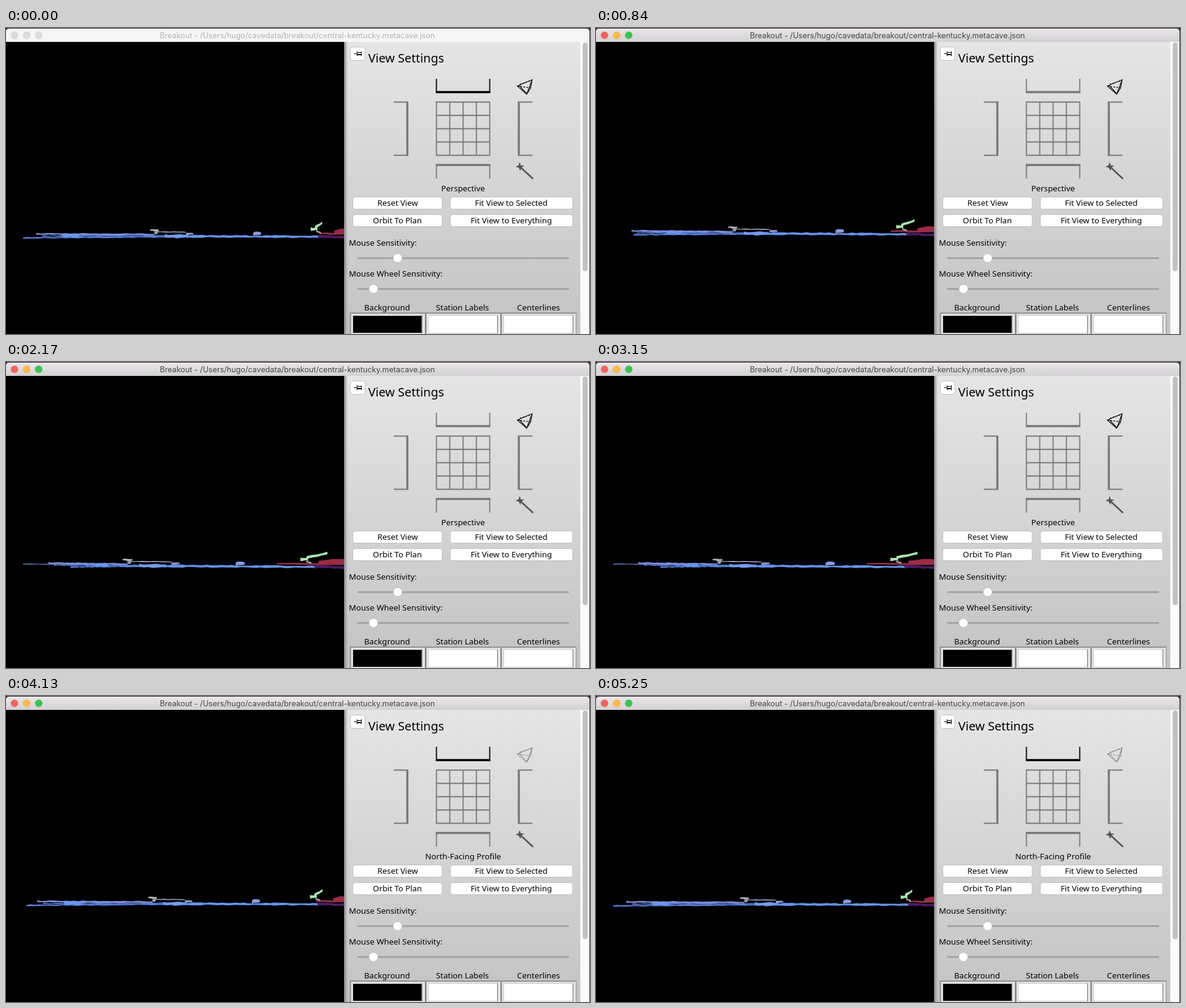
Write an HTML page with a canvas that moves like this. It is 964 px wide and 506 px high and loops after 5320 ms.

```html
<!DOCTYPE html>
<html lang="en">
<head>
<meta charset="utf-8">
<title>Cave viewer</title>
<style>
html, body { margin: 0; width: 100%; height: 100%; overflow: hidden; background: #000; }
#stage { position: relative; width: 964px; height: 506px; overflow: hidden; }
canvas, svg { position: absolute; left: 0; top: 0; display: block; }
text { font: 13.3px "Noto Sans", "Open Sans", sans-serif; fill: #000; }
.mid { text-anchor: middle; }
.head { font-size: 20px; }
.title { font: 12.7px Inter, Roboto, sans-serif; fill: #454545; }
.lines { fill: none; stroke: #777; stroke-width: 1.8; }
.thick { stroke-width: 3.4; }
.btn { fill: #fff; stroke: #b4b4b4; stroke-width: .8; }
.track { stroke: #a4a4a4; stroke-width: 3; stroke-linecap: round; }
.knob { fill: #fff; stroke: #aaa; stroke-width: .7; }
.north .top { stroke: #000; }
.eye { fill: none; stroke: #111; stroke-width: 1.3; }
.flying .eye { stroke: #777; stroke-width: .9; }
.idle .bar { fill: #f6f6f6; }
.idle .title { fill: #b4b4b4; }
.idle .light { fill: #dcdcdc; stroke: #cfcfcf; }
.light { stroke: #0002; stroke-width: .6; }
</style>
</head>
<body>
<div id="stage">
<canvas id="cave" width="558" height="506"></canvas>
<svg id="ui" width="964" height="506" viewBox="0 0 964 506">
  <defs>
    <linearGradient id="barFill" x2="0" y2="1"><stop stop-color="#e9e7e9"/><stop offset="1" stop-color="#d2d0d2"/></linearGradient>
    <linearGradient id="panelFill" x2="0" y2="1"><stop stop-color="#e5e5e5"/><stop offset="1" stop-color="#c3c3c3"/></linearGradient>
    <linearGradient id="edgeFill"><stop stop-color="#888"/><stop offset="1" stop-color="#888" stop-opacity="0"/></linearGradient>
  </defs>
  <rect width="964" height="2" fill="#3c2832"/>
  <path class="bar" fill="url(#barFill)" d="M0 23V6Q0 1 5 1H958Q963 1 963 6V23Z"/>
  <circle class="light" cx="14" cy="12" r="6" fill="#fc605b"/>
  <circle class="light" cx="34" cy="12" r="6" fill="#fdbc40"/>
  <circle class="light" cx="54" cy="12" r="6" fill="#34c84a"/>
  <text class="title mid" x="481" y="17">Breakout - /Users/hugo/cavedata/breakout/central-kentucky.metacave.json</text>

  <rect x="558" y="23" width="390" height="483" fill="url(#panelFill)"/>
  <rect x="558" y="23" width="6" height="483" fill="url(#edgeFill)"/>
  <rect x="948" y="23" width="15" height="483" fill="#fafafa"/>
  <rect x="952" y="24" width="8" height="378" rx="4" fill="#c1c1c1"/>
  <rect x="963" y="2" width="1" height="504" fill="#4b3a42"/>

  <rect class="btn" x="568.5" y="31.5" width="24" height="22" rx="4"/>
  <path d="M574.500 42.500H579M579.500 38.500V46.500M580 40.500H586M580 43.500H586M580 44.500H586M586.500 38.500V46.500" stroke="#000"/>
  <text class="head" x="598" y="56.500">View Settings</text>

  <g class="lines">
    <path id="grid"/>
    <path class="top" d="M710.500 84V107M798.500 84V107"/>
    <path class="top thick" d="M709.600 106H799.400"/>
    <path d="M710.500 225V249M798.500 225V249M640 122.500H664M640 210.500H664M845 122.500H869M845 210.500H869"/>
    <path class="thick" d="M709.600 226.500H799.400M662.500 122V211M846.500 122V211"/>
  </g>
  <g class="eye">
    <path d="M844 96L868.500 85.500L866 99L859.500 109.500ZM868.500 85.500L859.500 109.500"/>
    <path d="M844 96L866 99M848 93L867 87" stroke-dasharray="3 2"/>
    <path d="M847 95L860 109"/>
  </g>
  <path d="M848 229L870 249.500" stroke="#555" stroke-width="2.700"/>
  <path d="M848 221.500L849.700 227L856 228L850.500 230.500L849 236.500L846.500 231L841 229.500L846 227Z" fill="#555"/>

  <text id="mode" class="mid" x="754.500" y="270">Perspective</text>
  <g class="btn">
    <rect x="572.500" y="279.500" width="147.500" height="20" rx="4"/>
    <rect x="733.500" y="279.500" width="202" height="20" rx="4"/>
    <rect x="572.500" y="308.500" width="147.500" height="20" rx="4"/>
    <rect x="733.500" y="308.500" width="202" height="20" rx="4"/>
  </g>
  <text class="mid" x="646.500" y="294">Reset View</text>
  <text class="mid" x="834" y="294">Fit View to Selected</text>
  <text class="mid" x="646" y="323">Orbit To Plan</text>
  <text class="mid" x="834" y="323">Fit View to Everything</text>

  <text x="566" y="360">Mouse Sensitivity:</text>
  <path class="track" d="M581 380.500H928M581 431.500H928"/>
  <circle class="knob" cx="646.500" cy="380.500" r="7.500"/>
  <text x="566" y="411">Mouse Wheel Sensitivity:</text>
  <circle class="knob" cx="606.500" cy="431.500" r="7.500"/>

  <text class="mid" x="629" y="467">Background</text>
  <text class="mid" x="753.500" y="467">Station Labels</text>
  <text class="mid" x="879" y="467">Centerlines</text>
  <g id="swatches"></g>
</svg>
</div>
<script>
const LOOP = 5320, STEP = 70, DRAG = 140, REST = 2170, CLICK = 3430;
const byId = id => document.getElementById(id);
const ui = byId('ui'), mode = byId('mode'), ctx = byId('cave').getContext('2d');

let grid = '';
for (let i = 0; i <= 4; i++)
  grid += `M${710.5 + 22 * i} 121.600V211.400M709.600 ${122.5 + 22 * i}H799.400`;
byId('grid').setAttribute('d', grid);

byId('swatches').innerHTML = ['#000', '#fff', '#fff'].map((fill, i) => {
  const x = 568 + 124.5 * i;
  return `<rect x="${x}" y="471" width="124" height="40" fill="#e9e9e9" stroke="#868686"/>
    <path d="M${x + 1} 506V472H${x + 123}" fill="none" stroke="#727272"/>
    <rect x="${x + 4.5}" y="475.500" width="114" height="29" fill="${fill}" stroke="#c8c8c8"/>
    <path d="M${x + 119} 475V505" stroke="#777"/>`;
}).join('');

// Colour, thickness, both ends, and how far each end swings off the common depth.
const passages = [
  ['#5683e0', 2.4, 28, 347, 300, 345],
  ['#6a86da', 1.8, 110, 342, 190, 342, -111],
  ['#6084da', 1.8, 60, 344, 265, 343.5, -40],
  ['#8091e0', 2.8, 50, 340.5, 245, 341.5, -45],
  ['#6b94ea', 5, 92, 343, 120, 344, 15, 25],
  ['#729bee', 5.5, 262, 344, 301, 344.5],
  ['#6592ec', 4, 296, 344.5, 515, 345],
  ['#4d1b66', 4.5, 515, 345, 562, 345.5],
  ['#8f3042', 3, 517, 340, 562, 340, -65],
  ['#9a2b46', 7.5, 542, 337.5, 562, 336, -25],
  ['#8a9be0', 6, 408, 340.5, 421, 340, -8, -8],
  ['#9da0bb', 5, 245, 338.5, 250, 339],
  ['#a0a3bd', 1.6, 250, 337, 297, 337.5, 0, 13],
  ['#9199ca', 3, 297, 340.5, 309, 340, 13, 13],
  ['#b7b5b0', 3.2, 238, 334, 252, 334.5],
  ['#a9a2a2', 3, 512, 336.5, 520, 339, -11, -11],
  ['#a9e5ad', 6.5, 503, 332.5, 514, 332, -10, -10],
  ['#a9e5ad', 4, 510, 329.5, 522, 322.5, -8, 13]
];

const rnd = n => { const v = Math.sin(n * 12.9898) * 43758.5453; return v - Math.floor(v); };
const lerp = (a, b, f) => a + (b - a) * f;
const depth = x => -46 + (x > 235 ? .145 : -.6) * (x - 235);

// A rough-walled passage, sheared by depth as the view orbits by q.
function drawPassage([colour, width, x0, y0, x1, y1, swing0 = 0, swing1 = 0], id, q) {
  const n = Math.max(4, Math.round((x1 - x0) / 7));
  const roof = [], floor = [];
  for (let i = 0; i <= n; i++) {
    const f = i / n, x = lerp(x0, x1, f), seed = id * 61 + i;
    const sx = x + (depth(x) + lerp(swing0, swing1, f)) * q;
    const sy = lerp(y0, y1, f) - (8.3 - .004 * x) * Math.sin(q * Math.PI / 2);
    roof.push([sx, sy - width * lerp(.25, .65, rnd(seed))]);
    floor.unshift([sx, sy + width * lerp(.25, .65, rnd(seed + 2000))]);
  }
  ctx.fillStyle = colour;
  ctx.beginPath();
  for (const p of roof.concat(floor)) ctx.lineTo(...p);
  ctx.fill();
}

function orbit(t) {
  if (t >= CLICK) return Math.exp(-3.75 * (t - CLICK) / 1000);
  const u = Math.min(1, Math.max(0, (t - DRAG) / (REST - DRAG)));
  return 1 - (1 - u) ** 1.35;
}

const start = performance.now();
function tick(now) {
  const t = Math.floor(Math.max(0, now - start) % LOOP / STEP) * STEP;
  const flying = t >= CLICK;
  ui.classList.toggle('idle', t < STEP);
  ui.classList.toggle('flying', flying);
  ui.classList.toggle('north', flying || t <= DRAG);
  mode.textContent = flying ? 'North-Facing Profile' : 'Perspective';
  ctx.clearRect(0, 0, 558, 506);
  passages.forEach((p, i) => drawPassage(p, i, orbit(t)));
  requestAnimationFrame(tick);
}
tick(start);
</script>
</body>
</html>
```
